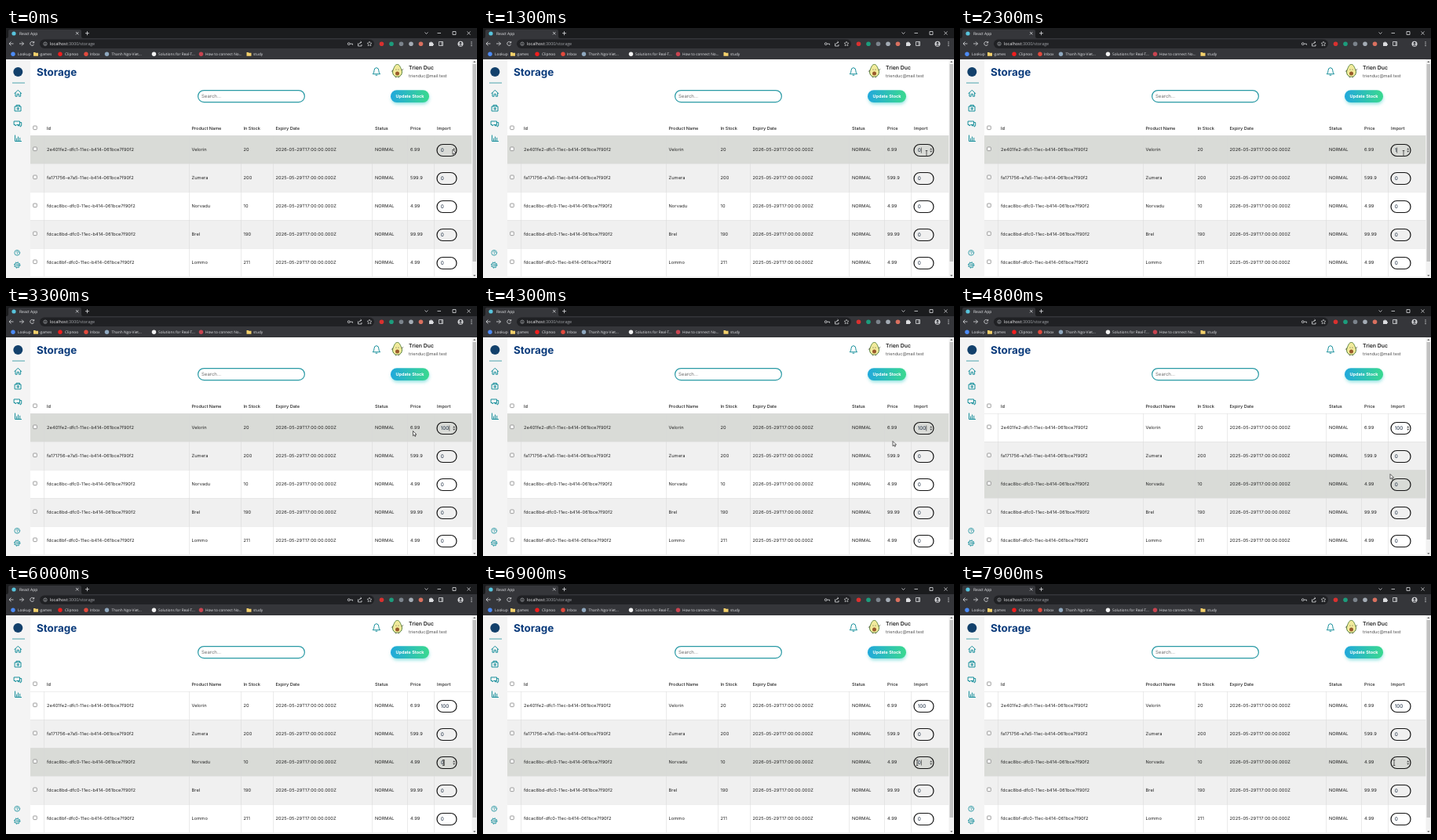
An HTML page for the animation above (8 s loop, 600 px wide and 319 px high).

```html
<!DOCTYPE html>
<html lang="en">
<head>
<meta charset="utf-8">
<title>Storage</title>
<style>
html, body { margin: 0; width: 100%; height: 100%; overflow: hidden; background: #fff; }
svg { display: block; width: 600px; height: 319px; }
text { font-family: Inter, sans-serif; text-rendering: geometricPrecision; white-space: pre; }
.ui { font-family: "Open Sans", "Noto Sans", sans-serif; }
.line { fill: none; stroke: #178f9b; stroke-width: 1; stroke-linejoin: round; stroke-linecap: round; }
.tool { fill: none; stroke: #dcdde0; stroke-width: .8; }
</style>
</head>
<body>
<svg id="stage" viewBox="0 0 600 319" xmlns="http://www.w3.org/2000/svg">
  <defs>
    <linearGradient id="btn"><stop offset="0" stop-color="#21a8dc"/><stop offset="1" stop-color="#3ad98f"/></linearGradient>
    <filter id="glow" x="-30%" y="-60%" width="160%" height="260%"><feGaussianBlur stdDeviation="2"/></filter>
  </defs>
</svg>
<script>
const stage = document.getElementById('stage');

function add(tag, attrs, parent = stage) {
  const el = document.createElementNS('http://www.w3.org/2000/svg', tag);
  for (const key in attrs) el.setAttribute(key, attrs[key]);
  return parent.appendChild(el);
}
const rect = (x, y, width, height, fill, more) => add('rect', { x, y, width, height, fill, ...more });
const dot = (cx, cy, r, fill, more) => add('circle', { cx, cy, r, fill, ...more });
const path = (d, cls, more) => add('path', { d, class: cls, ...more });
function text(str, x, y, size, fill = '#222', more = {}) {
  const el = add('text', { x, y, 'font-size': size, fill, ...more });
  el.textContent = str;
  return el;
}

function drawBrowser() {
  const ui = { class: 'ui' };
  rect(0, 0, 600, 40, '#35363a');
  rect(0, 0, 600, 13, '#1b1c1e');
  path('M1 13Q3 13 3 10V4Q3 2 5 2H94Q96 2 96 4V10Q96 13 98 13Z', '', { fill: '#35363a' });
  dot(10, 7, 2.6, '#58c4dc');
  text('React App', 17, 8.8, 5, '#e4e5e8', ui);
  path('M89 5l3.4 3.4M92.4 5L89 8.4M101 6.7h5M103.500 4.200v5', 'tool');
  path('M533.500 5.500l2 2 2-2M549.500 6.500h4.500M569 4.500h4v4h-4ZM587.500 4.500l4 4M591.500 4.500l-4 4', 'tool');

  rect(43, 14.500, 426, 11.500, '#202124', { rx: 5.75 });
  path('M9.500 20H4M6.500 17.500L4 20l2.500 2.500M17 20h5.500M20 17.500l2.500 2.500-2.500 2.500M35.400 18.600a2.500 2.500 0 1 0 .2 2.200M35.700 17v2h-2', 'tool');
  dot(50, 20.200, 2.2, 'none', { stroke: '#a5a8ad', 'stroke-width': .7 });
  path('M50 20v1.300M50 18.700v.5', 'tool');
  text('localhost', 56, 22.100, 5.4, '#f0f0f1', ui).insertAdjacentHTML('beforeend', '<tspan fill="#a2a5a9">:3000/storage</tspan>');
  dot(436.700, 20.200, 1.4, 'none', { stroke: '#dcdde0', 'stroke-width': .8 });
  path('M438.200 20.200h3.300v1.500M448.500 19.500v3.500h4.500v-2M449.800 20.700q.5-2.500 3-2.500m-1.200-1.200l1.300 1.200-1.300 1.200', 'tool');
  path('M463 17.200l.9 1.900 2.100.2-1.600 1.400.5 2.100-1.900-1.100-1.900 1.100.5-2.100-1.600-1.400 2.100-.2Z', 'tool', { style: 'stroke-width:.6' });
  [[478.500, '#d9302f'], [491, '#1c9c7c'], [503.500, '#7b838c'], [516, '#a4acb5'], [528.500, '#d9705f']]
    .forEach(([x, c]) => dot(x, 20.200, 2.8, c));
  path('M539 18.500h1.500a1 1 0 0 1 2 0h1.500v1.500a1 1 0 0 1 0 2v1h-5Z', '', { fill: '#dcdde0' });
  path('M551.500 17.500h5v5h-5ZM555 17.500v5', 'tool');
  dot(579, 20.200, 3.5, '#d4d5d8');
  dot(579, 19.200, 1.4, '#34363b');
  path('M576.500 22.500q2.500-3 5 0', '', { fill: '#34363b' });
  [17.900, 20.200, 22.500].forEach(y => dot(593, y, .65, '#dcdde0'));

  const marks = [
    ['Lookup', 15, 9, '#4c8bf5'], ['-games', 42, 38, 0], ['Clipnoo', 75, 69, '#f11e1e'],
    ['Inbox', 107, 102, '#e34a3d'], ['Thanh Ngo-Viet...', 134.500, 128.500, '#8fa8bf'],
    ['Solutions for Real-T...', 194, 188.500, '#f2f2f2'], ['How to connect No...', 254, 248.500, '#c94450'],
    ['study', 315, 309.500, 0]
  ];
  for (const [label, x, iconX, color] of marks) {
    if (color) dot(iconX, 33.200, 2.7, color);
    else path(`M${iconX - 3} 31h2.200l.8.8h3v4h-6Z`, '', { fill: '#f3d06b' });
    text(label, x, 35, 4.8, '#e4e5e8', ui);
  }
}

function drawSidebar() {
  rect(0, 40, 31, 279, '#f4f4f4');
  dot(15.300, 56, 6, '#12406b');
  rect(8, 69.600, 16, .9, '#3b9ba6');
  path('M11 83.500l4.300-4.300 4.300 4.300M12 82.600v4.600h2.200v-3h2.200v3h2.200v-4.600', 'line');
  path('M11.500 100h7.500v6h-7.500ZM13 100v-1.600h4.500v1.600M15.250 101.500v3M13.750 103h3', 'line');
  path('M10.500 119h7v4.500h-4l-1.500 1.500v-1.500h-1.500ZM18.500 120.500h1.200v4.200h-1v1.300l-1.500-1.300h-2', 'line');
  path('M11.500 137v7.500h8M13.500 144v-3M15.500 144v-5M17.700 144v-3.700', 'line');
  dot(14.200, 286.800, 3.4, 'none', { class: 'line', style: 'stroke-width:.8' });
  path('M13 286q.2-1.200 1.300-1.200t1.200 1.100-1.200 1.300v.5M14.300 288.800v.1', 'line', { style: 'stroke-width:.7' });
  dot(14.200, 302.500, 1.3, 'none', { class: 'line', style: 'stroke-width:.8' });
  dot(14.200, 302.500, 3.1, 'none', { class: 'line', style: 'stroke-width:.9' });
  dot(14.200, 302.500, 3.8, 'none', { stroke: '#178f9b', 'stroke-dasharray': '1.300 1.685', 'stroke-width': .9 });
}

function drawHeader() {
  text('Storage', 39, 61, 13.4, '#0b3c7c', { 'font-weight': 700 });
  path('M467.500 58.500q1.500-1.200 1.500-4.300 0-3.200 2.900-3.500 2.900.3 2.900 3.500 0 3.100 1.500 4.300ZM471 60.200h1.800', 'line');
  path('M498.500 46.500c3 0 3.700 3.500 5.200 6.300 2 3.800.2 9.500-5.200 9.500s-7.200-5.700-5.200-9.500c1.500-2.800 2.200-6.300 5.200-6.300Z', '', { fill: '#f2eb9c', stroke: '#55803a', 'stroke-width': 1 });
  dot(498.500, 58, 2.5, '#9a5a2c');
  path('M493.300 54l-2.500 1.500M503.700 54l2.500-1.500M496.500 62v1.500M500.500 62v1.500', '', { stroke: '#4a4a32', 'stroke-width': .7 });
  dot(497, 53, .5, '#333');
  dot(500, 53, .5, '#333');
  text('Trien Duc', 513, 53.300, 6.9, '#222', { 'font-weight': 600 });
  text('trienduc@mail.test', 513, 62.600, 5.5, '#555');

  rect(244.600, 79.600, 135.800, 15, '#fff', { rx: 7.5, stroke: '#2a9aa5', 'stroke-width': 1.2 });
  text('Search...', 249, 89.300, 6, '#6c6c6c');
  rect(491, 82, 48, 15, '#4fd0cf', { rx: 7.5, filter: 'url(#glow)', opacity: .65 });
  rect(490, 79.300, 49, 15.700, 'url(#btn)', { rx: 7.8 });
  text('Update Stock', 514.500, 89.200, 5.5, '#fff', { 'font-weight': 700, 'text-anchor': 'middle' });
}

const ROW_Y = 137, ROW_H = 36;
const columns = [52, 236.500, 302.500, 343.500, 470, 515, 549];
const items = [
  ['2e401fe2-dfc1', 'Velorin', '20', '2026', '6.99'],
  ['fa171756-e7a5', 'Zumera', '200', '2025', '599.9'],
  ['fdcac8bc-dfc0', 'Norvadu', '10', '2026', '4.99'],
  ['fdcac8bd-dfc0', 'Brel', '190', '2026', '99.99'],
  ['fdcac8bf-dfc0', 'Lommo', '211', '2025', '4.99']
];

function checkbox(y) {
  rect(34.700, y - 2.300, 4.600, 4.600, '#fff', { rx: .8, stroke: '#777', 'stroke-width': .7 });
}

function drawRow([id, name, stock, year, price], i) {
  const y = ROW_Y + i * ROW_H, mid = y + 19;
  const back = rect(31, y, 562.500, ROW_H, '#fff');
  [48.500, 233.500, 299.500, 340.500, 466.500, 511.500, 545.500].forEach(x => rect(x - .25, y, .5, ROW_H, '#d6d6d6'));
  rect(31, y, 562.500, .5, '#dcdcdc');
  checkbox(y + 17.300);
  const cells = [id + '-11ec-b414-061bce7f90f2', name, stock, year + '-05-29T17:00:00.000Z', 'NORMAL', price];
  cells.forEach((cell, c) => text(cell, columns[c], y + 20, 5.7, '#222', { 'letter-spacing': c == 4 ? 0 : .08 }));
  const box = rect(549, mid - 7.500, 25, 15, '#fff', { rx: 7.5, stroke: '#151515', 'stroke-width': 1.2 });
  const value = text('0', 553.700, mid + 2.300, 6.4, '#26364a');
  const caret = rect(0, mid - 3.500, .6, 7, '#222');
  const spin = path(`M569.200 ${mid - .7}l1.500-2 1.500 2ZM569.200 ${mid + .7}l1.500 2 1.500-2Z`, '', { fill: '#444' });
  return { back, box, value, caret, spin };
}

function drawTable() {
  checkbox(127.300);
  ['Id', 'Product Name', 'In Stock', 'Expiry Date', 'Status', 'Price', 'Import']
    .forEach((label, c) => text(label, columns[c], 129.800, 5.55, '#222', { 'font-weight': 500 }));
  const rows = items.map(drawRow);
  rect(31, 317, 562.500, 2, '#f1f1f1');
  rect(593.500, 40, 6.500, 279, '#f1f1f1');
  rect(594.500, 46, 4.500, 252, '#c1c1c1');
  path('M595.200 44l1.600-2 1.600 2ZM595.200 315l1.600 2 1.600-2Z', '', { fill: '#666' });
  return rows;
}

drawBrowser();
rect(0, 40, 600, 279, '#fff');
drawSidebar();
drawHeader();
const rows = drawTable();
const arrow = path('M0 0V6.200L1.500 4.900 2.500 7 3.500 6.500 2.600 4.500H4.500Z', '', { fill: '#fff', stroke: '#222', 'stroke-width': .7 });
const beam = path('M-1.300-3.500H1.300M0-3.500V3.500M-1.300 3.500H1.300', '', { stroke: '#222', 'stroke-width': .7 });

const LOOP = 8000, STEP = 100, BLINK = 500;
const mouse = [
  [0, 569, 155], [500, 569, 155], [900, 565, 160], [2900, 565, 160], [3200, 518.500, 159.500],
  [3700, 518.500, 159.500], [4200, 522, 172.500], [4300, 522, 172.500], [4400, 530, 192], [4500, 541, 213],
  [4700, 548, 214.500], [5100, 548, 214.500], [5500, 561, 227], [5800, 557.300, 228], [6300, 557.300, 228],
  [6700, 553, 228], [8000, 553, 228]
];
const pointer = [[0, 'arrow'], [700, 'beam'], [3000, 'arrow'], [5400, 'beam']];
const hovered = [[0, 0], [4400, 1], [4600, 2]];
const focused = [[0, -1], [1000, 0], [5600, 2]];
const spinning = [[0, 0], [5500, 2]];
const typed = {
  0: [[0, '0'], [2000, ''], [2300, '1'], [2800, '10'], [3000, '100']],
  2: [[0, '0'], [7000, '']]
};
const edits = [0, 1000, 2000, 2300, 2800, 3000, 5600, 7000];

const at = (steps, t) => steps.filter(s => s[0] <= t).pop()[1];

function mouseAt(t) {
  const i = mouse.findIndex(k => k[0] > t);
  const [t0, x0, y0] = mouse[i - 1], [t1, x1, y1] = mouse[i];
  const p = (t - t0) / (t1 - t0);
  return [x0 + (x1 - x0) * p, y0 + (y1 - y0) * p];
}

const show = (el, on) => el.setAttribute('visibility', on ? 'visible' : 'hidden');

function render(t) {
  const hover = at(hovered, t), focus = at(focused, t), spin = at(spinning, t);
  const lastEdit = edits.filter(e => e <= t).pop();
  const lit = Math.floor((t - lastEdit) / BLINK) % 2 === 0;
  rows.forEach((row, i) => {
    const fill = i === hover ? '#d9dbd7' : i % 2 ? '#f0f0f0' : '#fff';
    const value = typed[i] ? at(typed[i], t) : '0';
    row.back.setAttribute('fill', fill);
    row.box.setAttribute('fill', fill);
    row.value.textContent = value;
    row.caret.setAttribute('x', 553.900 + (value ? row.value.getComputedTextLength() : 0));
    show(row.caret, i === focus && lit);
    show(row.spin, i === spin);
  });
  const [x, y] = mouseAt(t), kind = at(pointer, t);
  for (const el of [arrow, beam]) el.setAttribute('transform', `translate(${x} ${y})`);
  show(arrow, kind === 'arrow');
  show(beam, kind === 'beam');
}

const start = performance.now();
function tick() {
  const t = (performance.now() - start) % LOOP;
  render(Math.floor(t / STEP) * STEP);
  requestAnimationFrame(tick);
}
tick();
</script>
</body>
</html>
```
